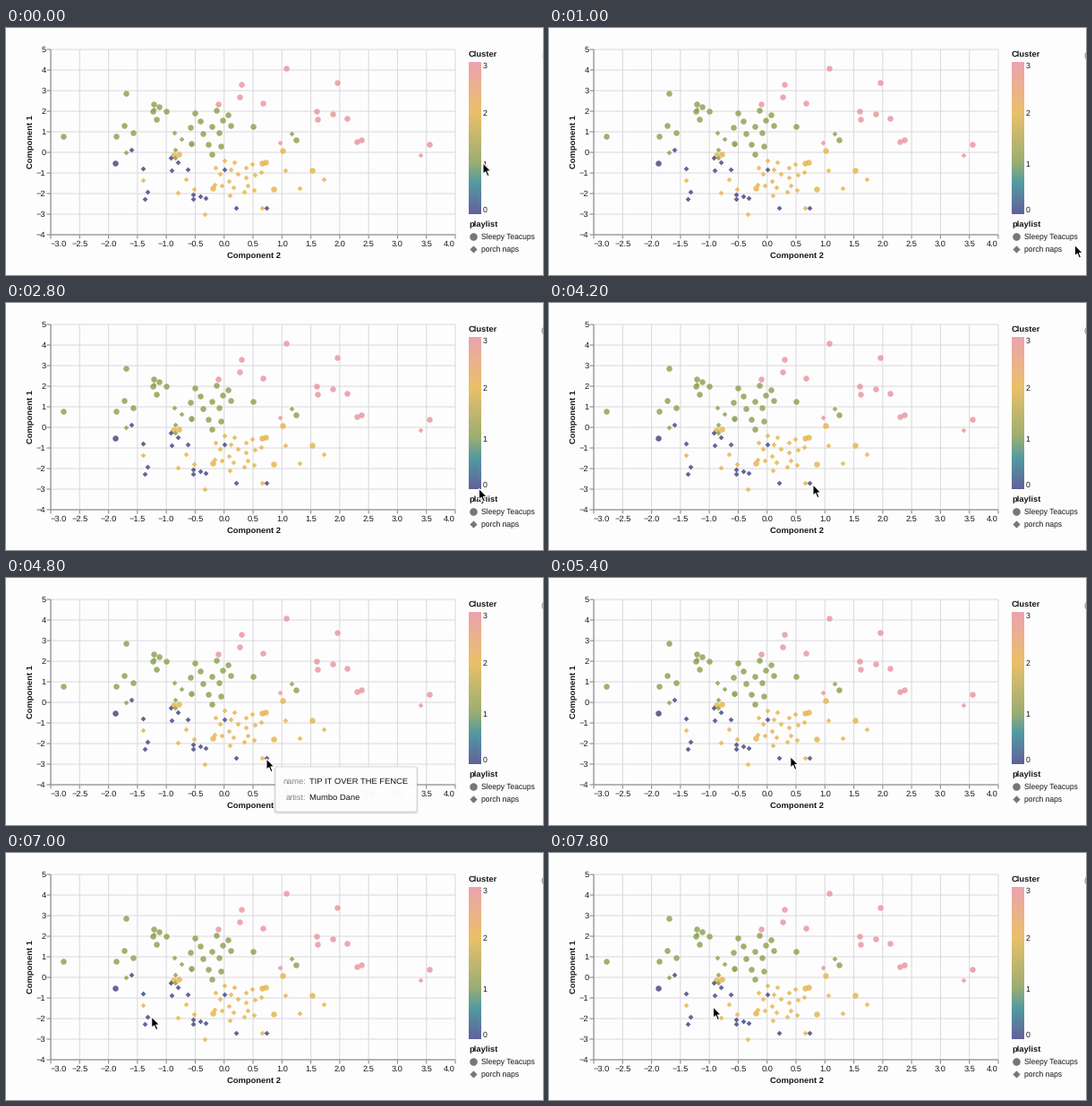
Write a matplotlib script that moves like this. It is 600 px wide and 276 px high and loops after 8000 ms.

```python
import numpy as np
import matplotlib.pyplot as plt
from matplotlib.animation import FuncAnimation
from matplotlib.colors import LinearSegmentedColormap
from matplotlib.patches import Circle, FancyBboxPatch, Polygon

W, H, DPI = 600, 276, 72          # at 72 dpi one point is one pixel
STEP, LOOP = 200, 8000

plt.rcParams["font.family"] = "Liberation Sans"
plt.rcParams["text.hinting"] = "none"

fig = plt.figure(figsize=(W / DPI, H / DPI), dpi=DPI, facecolor="#fefdfe")
ax = fig.add_axes([0, 0, 1, 1])
ax.axis("off")

LEFT, RIGHT, TOP, BOTTOM = 50, 502, 24, 231
GRID, AXIS, INK, GREY = "#dcdbde", "#8a8a8e", "#161616", "#77777b"
BLUE, GREEN, YELLOW, PINK = "#4c4c88", "#91a557", "#e6b852", "#ea9aa1"
rng = np.random.default_rng(7)


def px(v):
    """Horizontal chart value (-3 to 4) to pixels."""
    return LEFT + (np.asarray(v) + 3) * (RIGHT - LEFT) / 7


def py(v):
    """Vertical chart value (-4 to 5) to pixels."""
    return BOTTOM - (np.asarray(v) + 4) * (BOTTOM - TOP) / 9


def line(x0, y0, x1, y1, color):
    ax.plot([x0, x1], [y0, y1], color=color, lw=1.1, zorder=1,
            solid_capstyle="butt", snap=False)


def label(x, y, s, size=9.2, ha="center", color=INK, z=3, **kw):
    return ax.text(x, y, s, fontsize=size, ha=ha, va="center_baseline",
                   color=color, zorder=z, **kw)


def number(v, digits=0):
    return f"{v:.{digits}f}".replace("-", "\u2212")


def draw_axes():
    for v in np.arange(-3, 4.5, 0.5):
        x = px(v)
        line(x, TOP, x, BOTTOM, GRID)
        line(x, BOTTOM, x, BOTTOM + 4.5, AXIS)
        ha = {-3: "left", 4: "right"}.get(v, "center")
        label(x, 241, number(v, 1), ha=ha)
    for v in range(-4, 6):
        y = py(v)
        line(LEFT, y, RIGHT, y, GRID)
        line(LEFT - 4.5, y, LEFT, y, AXIS)
        label(44.5, y, number(v), ha="right")
    line(LEFT, TOP, LEFT, BOTTOM, AXIS)
    line(LEFT, BOTTOM, RIGHT, BOTTOM, AXIS)
    label(276.5, 254, "Component 2", 9.4, weight="bold")
    ax.text(27.5, 127, "Component 1", fontsize=9.4, weight="bold",
            rotation=90, ha="center", va="center", color=INK)


def cloud(n, cx, cy, rx, ry):
    """n points spread evenly over an ellipse, slightly shaken."""
    k = np.arange(n) + 0.5
    r = np.sqrt(k / n) + rng.uniform(-0.06, 0.06, n)
    a = k * np.pi * (3 - np.sqrt(5)) + rng.uniform(-0.3, 0.3, n)
    return np.column_stack([cx + rx * r * np.cos(a), cy + ry * r * np.sin(a)])


def dots(color, marker, *groups):
    x, y = np.vstack(groups).T
    ax.scatter(px(x), py(y), s=43 if marker == "o" else 17, c=color,
               marker=marker, alpha=0.86, linewidths=0, zorder=2)


def draw_points():
    dots(GREEN, "o", cloud(5, -1.13, 2.05, 0.18, 0.5),
         cloud(14, -0.25, 1.1, 0.45, 1.25), cloud(3, -1.75, 1.0, 0.2, 0.7),
         [(-2.79, 0.8), (-1.7, 2.87), (0.5, 1.24), (1.25, 0.63)])
    dots(PINK, "o", cloud(4, 1.83, 1.75, 0.42, 0.3),
         cloud(2, 2.36, 0.57, 0.08, 0.15), cloud(3, 0.2, 2.5, 0.5, 0.5),
         [(0.3, 3.3), (1.08, 4.1), (1.95, 3.38), (3.55, 0.37)])
    dots(YELLOW, "o", cloud(2, -0.8, -0.13, 0.1, 0.05),
         cloud(2, 0.71, -0.52, 0.08, 0.08),
         [(1.01, 0.08), (1.52, -0.85), (0.85, -1.8), (-0.2, -1.72)])
    dots(BLUE, "o", [(-1.88, -0.5)])
    dots(GREEN, "D", cloud(5, -0.75, 0.4, 0.25, 0.8),
         [(-1.7, 0.02), (-1.22, 2.07), (1.16, 0.91)])
    dots(PINK, "D", [(0.97, 0.5), (3.4, -0.15)])
    dots(YELLOW, "D", cloud(19, 0.2, -1.15, 0.48, 1.0),
         cloud(3, -0.68, -1.6, 0.2, 0.8),
         [(-1.41, -1.33), (-0.34, -3), (1.05, -0.85), (1.3, -1.75),
          (1.73, -1.3), (0.65, -2.68)])
    dots(BLUE, "D", cloud(4, -0.45, -2.2, 0.17, 0.2),
         cloud(4, -0.8, -0.7, 0.2, 0.65),
         [(-1.6, 0.15), (-1.4, -0.8), (-1.32, -1.93), (-1.38, -2.25),
          (0, -0.83), (0.21, -2.68), (0.74, -2.68)])


def draw_legend():
    stops = [(0, "#62629a"), (0.2, "#519aa2"), (0.34, "#9bae72"),
             (0.67, "#eac06a"), (1, "#eca3ad")]
    cmap = LinearSegmentedColormap.from_list("cluster", stops)
    ax.imshow(np.linspace(1, 0, 256)[:, None], cmap=cmap, aspect="auto",
              extent=(517, 531, 208, 38), zorder=2)
    label(517, 28.5, "Cluster", 9.4, "left", weight="bold")
    for v in range(4):
        # end labels are pulled inside the bar
        y = np.clip(208 - v * 170 / 3, 42, 203)
        label(532.5, y, str(v), 8.8, "left")
    label(517, 219, "playlist", 9.4, "left", weight="bold")
    rows = (("o", 74, "Sleepy Teacups", 233), ("D", 34, "porch naps", 247))
    for marker, size, name, y in rows:
        ax.scatter(522.3, y, s=size, c=GREY, marker=marker, linewidths=0,
                   zorder=2)
        label(531, y, name, 8.5, "left")


def make_tooltip():
    def box(grow, drop, radius, **kw):
        return ax.add_patch(FancyBboxPatch(
            (301 - grow, 211 - grow + drop), 158 + 2 * grow, 50 + 2 * grow,
            boxstyle=f"round,pad=0,rounding_size={radius}", **kw))

    parts = [box(g, 1, 3, fc="black", ec="none", alpha=0.05, zorder=5)
             for g in (0.5, 1.2, 2)]
    parts.append(box(0, 0, 2.5, fc=(1, 1, 1, 0.96), ec="#d6d6d8", lw=0.8,
                     zorder=6))
    rows = (("name:", "TIP IT OVER THE FENCE", 227),
            ("artist:", "Mumbo Dane", 244.5))
    for key, value, y in rows:
        parts.append(label(335, y, key, 9.3, "right", "#858589", 7))
        parts.append(label(339, y, value, 9.4, "left", "#111111", 7))
    return parts


ARROW = np.array([(0, 0), (0, 12.2), (2.8, 9.7), (4.9, 14.6), (7, 13.7),
                  (4.9, 8.9), (8.8, 8.9)])

# pointer stops: time in ms, x, y
STOPS = [(0, 533, 151), (1000, 587.5, 242.5), (1600, 552, 252),
         (2600, 528.5, 207.5), (2800, 528.5, 207.5), (4200, 295, 203),
         (4600, 291, 202), (5200, 291, 202), (6000, 155.5, 187),
         (6600, 155.5, 187), (7800, 183.5, 172)]
TIP_ON, TIP_OFF = 4600, 5200


def pointer_at(t):
    for (t0, *a), (t1, *b) in zip(STOPS, STOPS[1:]):
        if t <= t1:
            u = (t - t0) / (t1 - t0)
            return np.array(a) + np.subtract(b, a) * u * u * (3 - 2 * u)
    return np.array(STOPS[-1][1:])


draw_axes()
draw_points()
draw_legend()
tooltip = make_tooltip()
edge = ax.add_patch(Circle((604.6, 31), 5.6, fc="#e4e4e4", ec=GREY, lw=1,
                           zorder=3))
pointer = ax.add_patch(Polygon(ARROW, closed=True, fc="black", ec="white",
                               lw=1, joinstyle="round", zorder=10))
ax.set_xlim(0, W)
ax.set_ylim(H, 0)


def update(i):
    t = i * STEP
    pointer.set_xy(ARROW + pointer_at(t))
    for part in tooltip:
        part.set_visible(TIP_ON <= t <= TIP_OFF)
    edge.set_alpha(0.2 if t < 400 else 0.8)
    return [pointer, edge, *tooltip]


anim = FuncAnimation(fig, update, frames=LOOP // STEP, interval=STEP,
                     repeat=True, repeat_delay=0, blit=False)
plt.show()
```
